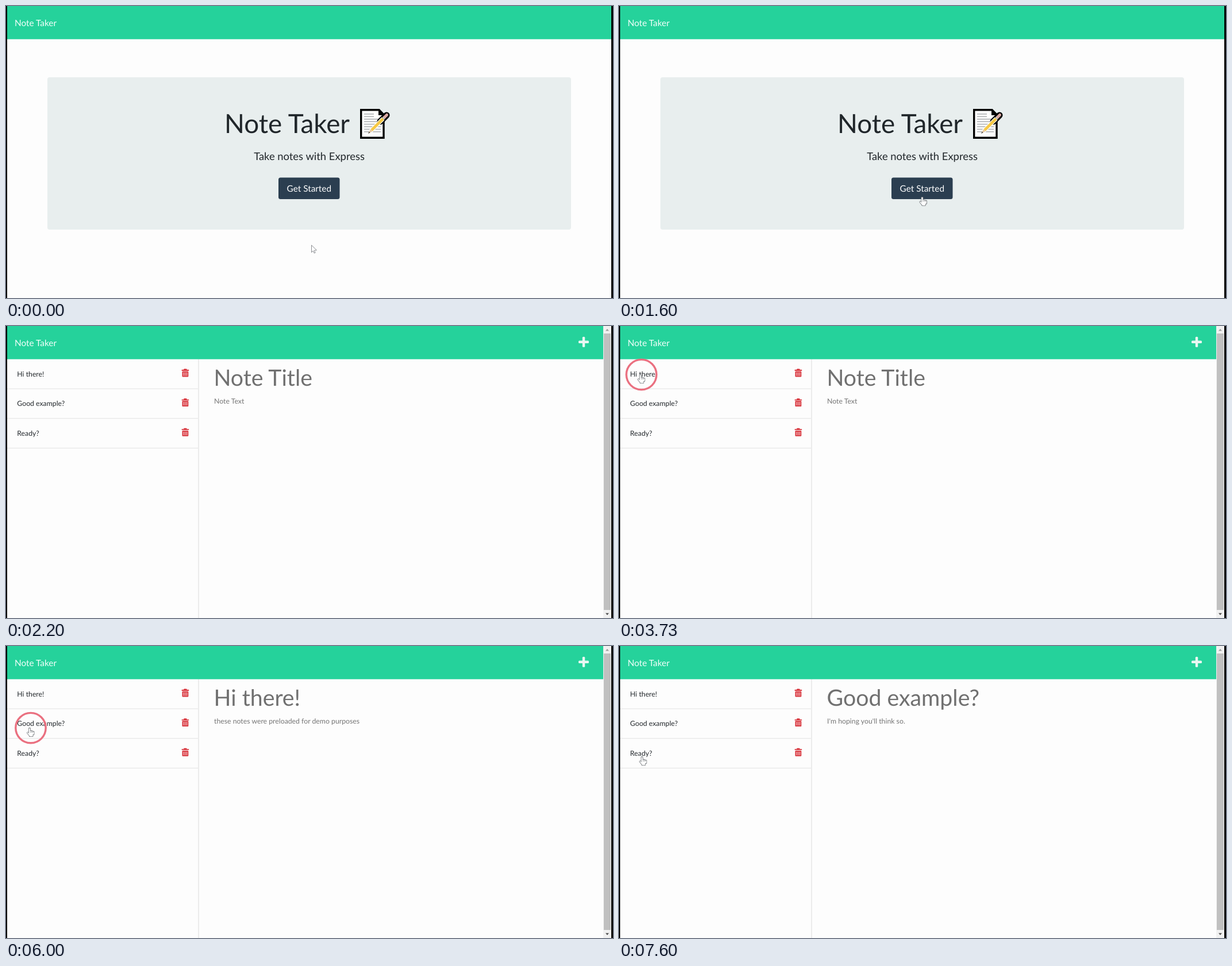
Animation of 1056x508 px, one loop 8 s. Source, as an HTML page with a canvas:

```html
<!DOCTYPE html>
<html lang="en">
<head>
<meta charset="utf-8">
<title>Note Taker</title>
<style>
html, body { margin: 0; width: 100%; height: 100%; overflow: hidden; background: #000; }
canvas { display: block; width: 1056px; height: 508px; }
</style>
</head>
<body>
<canvas id="stage" width="1056" height="508"></canvas>
<script>
const ctx = document.getElementById('stage').getContext('2d');
const LOOP = 8000;
const STEP = 1000 / 15;
const REM = 13.09;
const PAGE = '#fdfdfd';
const RING_TIME = 190;
const OPEN_DELAY = 215;

const items = ['Hi there!', 'Good example?', 'Ready?'];
// Each click opens the next view
const clicks = [1940, 3660, 5980];
const notes = [
  ['Note Title', 'Note Text'],
  [items[0], 'these notes were preloaded for demo purposes'],
  [items[1], "I'm hoping you'll think so."]
];
const home = { x: 531, y: 416 };
const moves = [
  { from: 0, to: 400, x: 530, y: 400 },
  { from: 1067, to: 1933, x: 527, y: 320 },
  { from: 2733, to: 3400, x: 37, y: 84 },
  { from: 4867, to: 5400, x: 41, y: 142 },
  { from: 6933, to: 7600, x: 40, y: 192 }
];

const clamp = v => Math.min(1, Math.max(0, v));
const easeOut = k => 1 - (1 - k) ** 2;

function rect(x, y, w, h, color, r = 0) {
  ctx.fillStyle = color;
  ctx.beginPath();
  ctx.roundRect(x, y, w, h, r);
  ctx.fill();
}

function text(str, x, y, rem, color, align = 'left') {
  ctx.font = `${rem * REM}px Lato, sans-serif`;
  ctx.textRendering = 'geometricPrecision';
  ctx.textAlign = align;
  ctx.fillStyle = color;
  ctx.fillText(str, x, y);
}

function line(x1, y1, x2, y2, color, width, cap = 'butt') {
  ctx.strokeStyle = color;
  ctx.lineWidth = width;
  ctx.lineCap = cap;
  ctx.beginPath();
  ctx.moveTo(x1, y1);
  ctx.lineTo(x2, y2);
  ctx.stroke();
}

function shape(path, x, y, fill, stroke, width) {
  ctx.save();
  ctx.translate(x, y);
  const p = new Path2D(path);
  ctx.fillStyle = fill;
  ctx.fill(p);
  if (stroke) {
    ctx.strokeStyle = stroke;
    ctx.lineWidth = width;
    ctx.stroke(p);
  }
  ctx.restore();
}

function memo(x, y) {
  shape('M1.7 1.7H33L41 10V50.3H1.7Z', x, y, '#fff', '#000', 3.4);
  shape('M32 2L41 11H32Z', x, y, '#000');
  for (let i = 0; i < 8; i++) {
    const ly = y + 9 + i * 4.4;
    line(x + 7, ly, x + (i < 2 ? 24 : 36), ly, '#a9abae', 1.5);
  }
  // Pencil parts lie on one diagonal, measured from its tip
  const part = (a, b, color, width, cap) =>
    line(x + 14 + a, y + 43 - a, x + 14 + b, y + 43 - b, color, width, cap);
  part(21, 32, '#000', 11, 'round');
  part(4, 26, '#fff', 7);
  part(6, 26, '#f7c945', 5);
  part(26, 29, '#c9c9c9', 5);
  part(29, 32.5, '#d9a9a3', 5, 'round');
  shape('M0 0L4.2 -7.8L7.8 -4.2Z', x + 14, y + 43, '#e8c9a0');
  shape('M0 0L1.8 -3.3L3.3 -1.8Z', x + 14, y + 43, '#333');
}

function trash(x, y) {
  const red = '#d9363e';
  rect(x, y + 1.6, 12.6, 1.8, red, 0.5);
  rect(x + 3.6, y, 5.4, 2.2, red, 0.8);
  rect(x + 0.9, y + 4.2, 10.8, 9.8, red, 1.2);
  for (let i = 0; i < 3; i++) rect(x + 3.1 + i * 2.8, y + 6, 0.9, 6.2, PAGE);
}

function header(width) {
  rect(2, 0, width, 57.7, '#25d29b');
  text('Note Taker', 15, 35, 1.172, '#f4fffb');
}

function landing(t) {
  header(1051);
  rect(72, 124, 911, 265, '#e8eeee', 4);
  text('Note Taker', 380, 221, 3.5, '#20262a');
  memo(616, 179);
  text('Take notes with Express', 527.5, 268, 1.406, '#20262a', 'center');
  if (t >= clicks[0]) rect(473, 297.5, 108.5, 39.5, '#97a4ab', 4.5);
  const hover = clamp((t - 1600) / 150);
  rect(474, 298.5, 106.5, 37.5, `hsl(208 30% ${24 - 8 * hover}%)`, 3.5);
  text('Get Started', 527.3, 323, 1.172, '#fff', 'center');
}

function scrollbar() {
  rect(1039, 0, 14, 508, '#f1f1f1');
  rect(1040, 13, 12, 481, '#c0c0c0');
  shape('M-3 2L3 2L0 -1.5Z', 1046, 6.5, '#9b9b9b');
  shape('M-3 -2L3 -2L0 1.5Z', 1046, 501.5, '#4d4d4d');
}

function notesPage(view) {
  header(1037);
  rect(996, 25.6, 18, 4.4, '#e9f7f2', 1.5);
  rect(1002.8, 18.8, 4.4, 18, '#e9f7f2', 1.5);
  line(335, 58, 335, 508, '#dfdfdf', 1.1);
  items.forEach((name, i) => {
    const y = 58 + i * 51.6;
    text(name, 19.3, y + 29.7, 0.9375, '#24292d');
    trash(305.6, y + 16.5);
    line(2, y + 51.2, 334, y + 51.2, '#e2e2e2', 1);
  });
  const [title, body] = notes[view];
  text(title, 361.5, 104.3, 3, '#707070');
  text(body, 362, 135.2, 0.9375, '#757575');
  scrollbar();
}

function pointerAt(t) {
  let { x, y } = home;
  for (const m of moves) {
    const k = easeOut(clamp((t - m.from) / (m.to - m.from)));
    x += (m.x - x) * k;
    y += (m.y - y) * k;
  }
  return [x, y];
}

function arrow(x, y) {
  shape('M.5 .5V12.6L3.3 10L5.2 14L7.1 13.2L5.3 9.2L9 8.8Z', x, y, '#fff', '#6e7276', 0.8);
}

// The same rounded parts drawn twice: grown for the outline, shrunk for the fill
function hand(x, y) {
  for (const [grow, color] of [[0.4, '#74787c'], [-0.4, '#fff']]) {
    const part = (px, py, w, h, r) =>
      rect(x + px - grow, y + py - grow, w + 2 * grow, h + 2 * grow, color, r);
    line(x - 3.2, y + 9, x, y + 13, color, 2.6 + 2 * grow, 'round');
    for (let i = 0; i < 3; i++) part(1.2 + i * 2.2, 5 + i * 0.7, 2.4, 6, 1.2);
    part(-1.5, 0.5, 3, 11, 1.4);
    part(-1, 8.5, 8.6, 4, 1.5);
    part(-0.6, 11, 6.6, 4.6, 1);
  }
}

function pointer(t, onLanding) {
  const [x, y] = pointerAt(t);
  if (onLanding) {
    const overButton = y < 336 && t < 2100;
    (overButton ? hand : arrow)(x, y);
  } else if (x < 335 && y < 212) {
    hand(x, y);
  }
  if (clicks.some(c => t >= c && t < c + RING_TIME)) {
    ctx.strokeStyle = '#ea7080';
    ctx.lineWidth = 3.4;
    ctx.beginPath();
    ctx.arc(x + 2, y + 0.6, 26.2, 0, Math.PI * 2);
    ctx.stroke();
  }
}

function draw(t) {
  rect(0, 0, 1056, 508, '#000');
  rect(2, 0, 1051, 508, PAGE);
  const opened = clicks.filter(c => t >= c + OPEN_DELAY).length;
  if (opened) notesPage(opened - 1); else landing(t);
  pointer(t, !opened);
}

const start = performance.now();
function tick() {
  const t = (performance.now() - start) % LOOP;
  draw(Math.floor((t + 7) / STEP) * STEP);
  requestAnimationFrame(tick);
}
tick();
</script>
</body>
</html>
```
